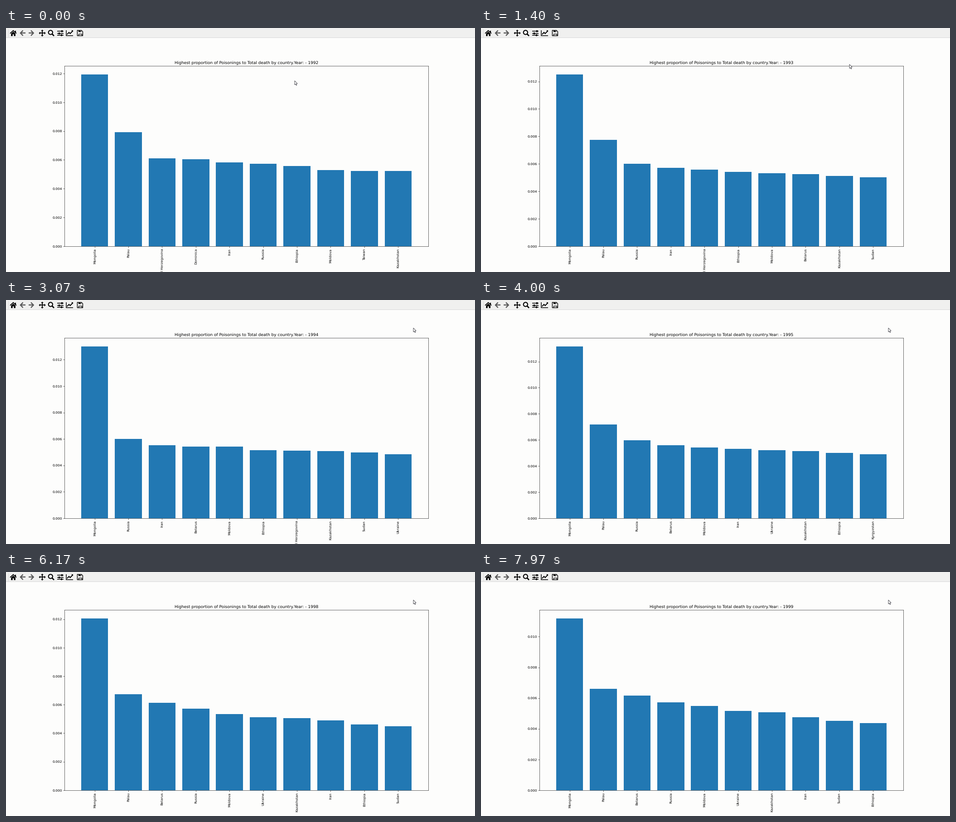
A matplotlib script that plays this animation: 1035x541 px, repeating every 8000 ms.

```python
import numpy as np
import matplotlib.pyplot as plt
from matplotlib.animation import FuncAnimation
from matplotlib.patches import Circle, Polygon, Rectangle
from matplotlib.ticker import FormatStrFormatter, MultipleLocator

W, H, DPI = 1035, 541, 64
FRAMES, STEP = 250, 32
TOOLBAR = 22
PT = 72 / DPI              # points per pixel
S = W / 19.2 / DPI         # scale of the default chart sizes
PAPER, BAR, GREY = "#fdfdfc", "#2278b3", "#595959"

plt.rcParams.update({
    "font.family": "DejaVu Sans",
    "font.size": 10 * S,
    "axes.titlesize": 12 * S,
    "axes.titlepad": 6 * S,
    "axes.linewidth": 0.8 * S,
    "text.hinting": "no_hinting",
    "toolbar": "None",
})
for axis in ("xtick", "ytick"):
    plt.rcParams.update({
        f"{axis}.labelsize": 10 * S,
        f"{axis}.major.size": 3.5 * S,
        f"{axis}.major.width": 0.8 * S,
        f"{axis}.major.pad": 3.5 * S,
    })

BOSNIA = "Bosnia and Herzegovina"
# start time in ms, countries, shares in units of 1e-5
YEARS = [
    (0, ["Mongolia", "Palau", BOSNIA, "Dominica", "Iran", "Russia",
         "Ethiopia", "Moldova", "Taiwan", "Kazakhstan"],
     [1193, 793, 611, 606, 584, 572, 558, 529, 522, 522]),
    (1000, ["Mongolia", "Palau", "Russia", "Iran", BOSNIA, "Ethiopia",
            "Moldova", "Belarus", "Kazakhstan", "Sudan"],
     [1250, 775, 600, 570, 558, 540, 532, 524, 512, 503]),
    (2016, ["Mongolia", "Russia", "Iran", "Belarus", "Moldova", "Ethiopia",
            BOSNIA, "Kazakhstan", "Sudan", "Ukraine"],
     [1299, 600, 552, 541, 541, 516, 511, 508, 497, 485]),
    (3072, ["Mongolia", "Palau", "Russia", "Belarus", "Moldova", "Iran",
            "Ukraine", "Kazakhstan", "Ethiopia", "Kyrgyzstan"],
     [1315, 719, 599, 561, 541, 532, 523, 514, 499, 490]),
    (4110, ["Mongolia", "Palau", "Russia", "Belarus", "Moldova", "Ukraine",
            "Iran", "Kazakhstan", "Ethiopia", "Kyrgyzstan"],
     [1300, 710, 585, 574, 534, 526, 521, 515, 480, 478]),
    (5130, ["Mongolia", "Palau", "Belarus", "Russia", "Moldova", "Ukraine",
            "Kazakhstan", "Iran", "Ethiopia", "Sudan"],
     [1256, 694, 593, 575, 535, 519, 511, 505, 471, 460]),
    (6140, ["Mongolia", "Palau", "Belarus", "Russia", "Moldova", "Ukraine",
            "Kazakhstan", "Iran", "Ethiopia", "Sudan"],
     [1204, 675, 612, 572, 533, 512, 506, 490, 462, 449]),
    (7180, ["Mongolia", "Palau", "Belarus", "Russia", "Moldova", "Ukraine",
            "Kazakhstan", "Iran", "Sudan", "Ethiopia"],
     [1118, 662, 618, 572, 549, 516, 508, 477, 451, 437]),
]

fig = plt.figure(figsize=(W / DPI, H / DPI), dpi=DPI, facecolor=PAPER)
page = H - TOOLBAR
ax = fig.add_axes([0.125, 0.11 * page / H, 0.775, 0.77 * page / H],
                  facecolor=PAPER)
ax.set_xlim(-0.89, 9.89)
ax.yaxis.set_major_locator(MultipleLocator(0.002))
ax.yaxis.set_major_formatter(FormatStrFormatter("%.3f"))
bars = ax.bar(range(10), np.ones(10), width=0.8, color=BAR)
ax.set_xticks(range(10))

# Overlay in stage pixels, y pointing down
ui = fig.add_axes([0, 0, 1, 1], zorder=5)
ui.set_xlim(0, W)
ui.set_ylim(H, 0)
ui.axis("off")


def line(pts, width, color="black"):
    ui.plot(*zip(*pts), color=color, lw=width * PT,
            solid_capstyle="butt", solid_joinstyle="miter")


def shape(pts, color="black"):
    ui.add_patch(Polygon(pts, fc=color, ec="none"))


def box(x, y, w, h, color="black"):
    ui.add_patch(Rectangle((x, y), w, h, fc=color, ec="none"))


def draw_toolbar():
    box(0, 0, W, 21, "#f0f0ef")
    box(0, 21, W, 1, "#d8d8d8")
    for y in range(3, 20, 2):
        box(5, y, 1, 1, "#c4c4c4")

    # home
    line([(9, 12), (16, 5.6), (23, 12)], 1.8)
    box(19.6, 5.5, 2, 4)
    shape([(11.2, 12.2), (16, 8), (20.8, 12.2), (20.8, 18), (17.4, 18),
           (17.4, 14), (14.6, 14), (14.6, 18), (11.2, 18)])

    # back and forward
    for tip, d in ((30.5, 1), (62, -1)):
        line([(tip + 1 * d, 11.2), (tip + 12.2 * d, 11.2)], 2.4, GREY)
        line([(tip + 7 * d, 5.4), (tip + 1.4 * d, 11.2),
              (tip + 7 * d, 17)], 2.4, GREY)

    # pan
    cx, cy = 80, 11.3
    for dx, dy in ((1, 0), (-1, 0), (0, 1), (0, -1)):
        line([(cx, cy), (cx + 5 * dx, cy + 5 * dy)], 1.9)
        bx, by = cx + 4.6 * dx, cy + 4.6 * dy
        shape([(cx + 7.6 * dx, cy + 7.6 * dy),
               (bx + 3 * dy, by + 3 * dx), (bx - 3 * dy, by - 3 * dx)])

    # zoom
    ui.add_patch(Circle((98.3, 9.8), 4.6, fc="none", ec="black", lw=2.1 * PT))
    line([(101.4, 12.9), (106, 17.6)], 2.7)

    # sliders
    for y, knob in ((6.6, 121.5), (11.5, 115.5), (16.4, 120.5)):
        line([(113, y), (127, y)], 1.6)
        box(knob, y - 2, 3, 4)

    # plot options
    line([(133, 5), (133, 17), (148.3, 17)], 1.5)
    line([(134.8, 14.2), (139, 9.8), (141.6, 12.4), (146.3, 7.4)], 2)
    shape([(143.8, 5.2), (148, 5.2), (148, 9.4)])

    # save
    line([(157.4, 5.3), (166.6, 5.3), (169.4, 8.2), (169.4, 17.2),
          (157.4, 17.2), (157.4, 4.7)], 1.4)
    box(159.6, 5, 6.6, 4.4)
    box(163.6, 6, 1.6, 2.4, "#f0f0ef")
    line([(160, 17), (160, 12.7), (166.9, 12.7), (166.9, 17)], 1.3)


draw_toolbar()
readout = ui.text(1034.5, 11, "", family="Liberation Sans", size=7 * PT,
                  ha="right", va="center")
ARROW = np.array([(0, 0), (0, 8.8), (2, 7.1), (3.4, 10.2), (4.8, 9.6),
                  (3.5, 6.5), (6.1, 6.3)])
pointer = Polygon(ARROW, fc="white", ec="#303038", lw=0.8 * PT)
ui.add_patch(pointer)


def ease(t, start, end):
    u = np.clip((t - start) / (end - start), 0, 1)
    return u * u * (3 - 2 * u)


def pointer_at(t):
    a, b = ease(t, 400, 900), ease(t, 1040, 1600)
    return np.array([637 + 18 * a + 244 * b, 117 - 2 * a - 53 * b])


def show_chart(index):
    _, names, shares = YEARS[index]
    values = np.array(shares) * 1e-5
    for bar, value in zip(bars, values):
        bar.set_height(value)
    ax.set_ylim(0, values.max() * 1.05)
    ax.set_xticklabels(names, rotation=90)
    ax.set_title("Highest proportion of Poisonings to Total death by "
                 f"country.Year: - {1992 + index}")
    return names


def update(i):
    t = i * STEP
    names = show_chart(sum(start <= t for start, *_ in YEARS) - 1)
    tip = pointer_at(t)
    pointer.set_xy(ARROW + tip)
    x, y = ax.transData.inverted().transform((tip[0], H - tip[1]))
    inside = t > 400 and y < ax.get_ylim()[1]
    readout.set_text(f"x={names[int(round(x))]} y={y:.5f}" if inside else "")
    return []


anim = FuncAnimation(fig, update, frames=FRAMES, interval=STEP,
                     init_func=lambda: update(0), repeat=True,
                     repeat_delay=0, blit=False)
plt.show()
```
